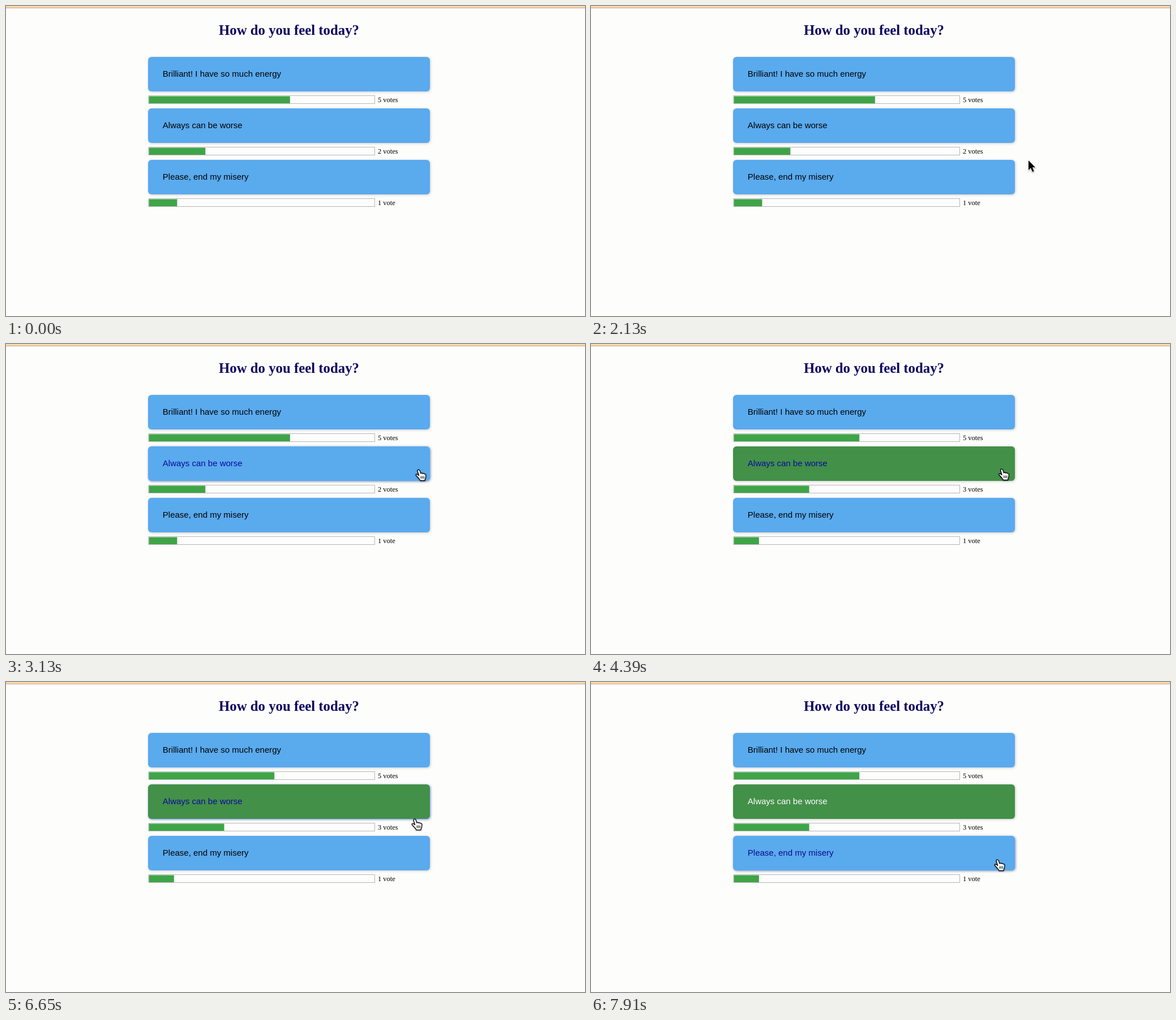
Animation of 1023x548 px, one loop 8000 ms. Source, as an HTML page:

```html
<!DOCTYPE html>
<html lang="en">
<head>
<meta charset="utf-8">
<title>Mood poll</title>
<style>
  html, body { margin: 0; width: 100%; height: 100%; overflow: hidden; background: #fdfdfc; }
  svg { display: block; }
  text { white-space: pre; }
  .title { font: bold 24.8px "Liberation Serif", serif; fill: #0b0560; text-anchor: middle; }
  .label { font: 15px "Liberation Sans", sans-serif; }
  .votes { font: 12.4px "Liberation Serif", serif; }
  .frame { fill: #fdfdfd; stroke: #b5b9b5; }
  .fill { fill: #3fa447; }
  #cursor { filter: drop-shadow(0 1px 1px rgba(0, 0, 0, .35)); }
</style>
</head>
<body>
<svg id="stage" width="1023" height="548" viewBox="0 0 1023 548">
  <rect width="1023" height="548" fill="#fdfdfc"/>
  <rect width="1023" height="3" fill="#fdd9ae"/>
  <rect y="3" width="1023" height="1" fill="#c5a487"/>
  <text class="title" x="500" y="51">How do you feel today?</text>
  <g id="poll"></g>
  <g id="cursor">
    <path id="arrow" d="M0 0V17L3.9 13.3L7 20.2L9.8 19L6.8 12.3H12Z" fill="#000" stroke="#fff" stroke-width="1.6" paint-order="stroke"/>
    <g id="hand" transform="translate(-5 -1)" stroke="#000" stroke-width="1.3" stroke-linejoin="round">
      <path fill="#fff" d="M4 3C4 1 7 .5 8 2.5L10 8C11 6.5 13 7 13.2 8.3C14.5 7 16.2 7.8 16.3 9C18 8.3 19 9.5 18.8 11L18.5 15C18 17 17 18 17 20.5H9C8.5 18 6 16.5 4.5 14.5C3 12.5 1 11.5 1.2 10C2 8.5 4.5 9.5 6.5 11.5Z"/>
      <path d="M10.3 12.5V17M12.8 12.5V17M15.3 12.5V17" stroke-width="1"/>
    </g>
  </g>
</svg>
<script>
const LOOP = 8000, SHOW = 1480, ENTER = 2600, CLICK = 4310, LEAVE = 6700, ENTER_LAST = 6960;
const BLUE = '#5aaaee', GREEN = '#439049';
const REST = [0, 0, 0, .2], HOVER = [20, 40, 110, .55], HOVER_VOTED = [30, 80, 220, .65];

// Cursor hotspot: time, x, y
const PATH = [
  [1480, 761, 488], [1610, 762, 415], [1710, 766, 345], [1900, 772, 293],
  [2100, 773, 273], [2180, 773, 273], [2450, 759, 262], [2600, 748, 240],
  [2850, 730, 224], [3130, 728, 222], [3500, 724.5, 221], [6430, 724.5, 221],
  [6650, 721, 242], [6740, 721, 246], [6960, 719, 273], [7180, 717, 314], [8000, 717, 314]
];

const $ = id => document.getElementById(id);
const clamp = v => Math.max(0, Math.min(1, v));
const ramp = (t, start, length = 300) => clamp((t - start) / length);
const mix = (a, b, p) => a + (b - a) * p;
const rgba = (a, b, p) => `rgba(${a.map((v, i) => mix(v, b[i], p)).join()})`;

function add(tag, attrs) {
  const node = document.createElementNS('http://www.w3.org/2000/svg', tag);
  for (const key in attrs) node.setAttribute(key, attrs[key]);
  return $('poll').appendChild(node);
}

const options = ['Brilliant! I have so much energy', 'Always can be worse', 'Please, end my misery']
  .map((caption, i) => {
    const y = 90 + 91 * i;
    const button = add('rect', { x: 251, y, width: 498, height: 61, rx: 6 });
    const label = add('text', { class: 'label', x: 276.8, y: y + 35 });
    label.textContent = caption;
    add('rect', { class: 'frame', x: 252, y: y + 68.5, width: 399.5, height: 14 });
    const fill = add('rect', { class: 'fill', x: 252.5, y: y + 69.5, height: 12.5 });
    const votes = add('text', { class: 'votes', x: 657, y: y + 80 });
    return { button, label, fill, votes };
  });

function cursorAt(t) {
  const next = Math.max(1, PATH.findIndex(p => p[0] > t));
  const [a, b] = [PATH[next - 1], PATH[next]];
  const p = clamp((t - a[0]) / (b[0] - a[0]));
  return [mix(a[1], b[1], p), mix(a[2], b[2], p)];
}

function render(t) {
  const voted = t >= CLICK;
  const overSecond = t >= ENTER && t < LEAVE;
  const overThird = t >= ENTER_LAST;
  const counts = [5, voted ? 3 : 2, 1];
  const total = counts[0] + counts[1] + counts[2];

  // The shadow restarts from rest after the vote
  const secondGlow = t < CLICK ? ramp(t, ENTER)
    : t < LEAVE ? ramp(t, CLICK + 90)
    : 1 - ramp(t, LEAVE);
  const glow = [0, secondGlow, ramp(t, ENTER_LAST)];
  const inks = ['#000', overSecond ? '#0a0a9c' : voted ? '#fff' : '#000', overThird ? '#0a0a8c' : '#000'];

  options.forEach(({ button, label, fill, votes }, i) => {
    const chosen = voted && i === 1;
    button.style.fill = chosen ? GREEN : BLUE;
    const shade = rgba(REST, chosen ? HOVER_VOTED : HOVER, glow[i]);
    button.style.filter = `drop-shadow(1.5px 1.5px 2px ${shade})`;
    label.style.fill = inks[i];
    fill.setAttribute('width', 399 * counts[i] / total);
    votes.textContent = `${counts[i]} vote${counts[i] > 1 ? 's' : ''}`;
  });

  const pointing = overSecond || overThird;
  const [x, y] = cursorAt(t);
  $('cursor').setAttribute('transform', `translate(${x} ${y})`);
  $('cursor').style.display = t < SHOW ? 'none' : '';
  $('arrow').style.display = pointing ? 'none' : '';
  $('hand').style.display = pointing ? '' : 'none';
}

const start = performance.now();
function tick() {
  render((performance.now() - start) % LOOP);
  requestAnimationFrame(tick);
}
tick();
</script>
</body>
</html>
```
